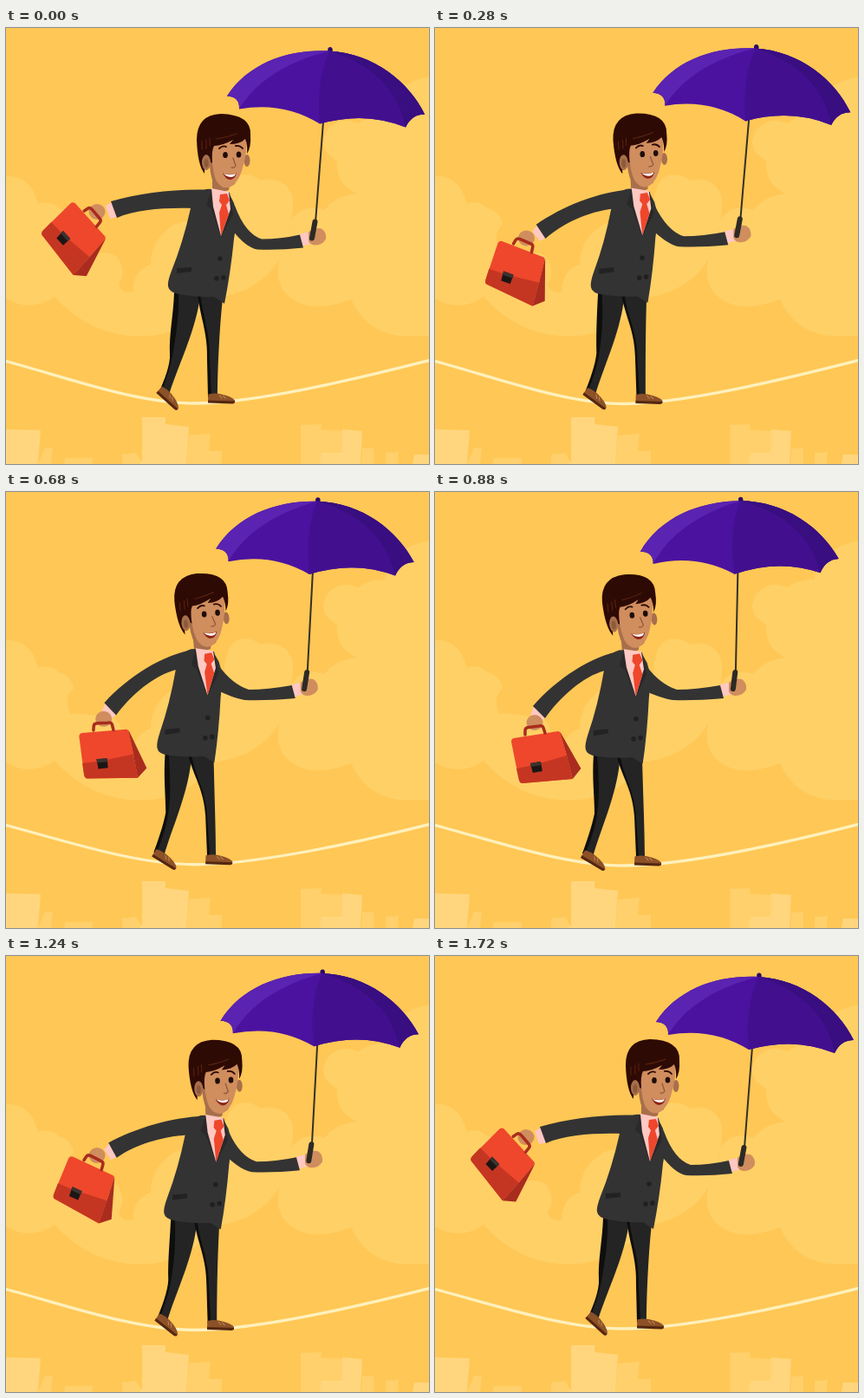
These frames come from a looping animation (488x503 px, 1760 ms). An HTML page with a canvas:

```html
<!DOCTYPE html>
<html lang="en">
<head>
<meta charset="utf-8">
<title>Tightrope walker</title>
<style>
  html, body { margin: 0; width: 100%; height: 100%; overflow: hidden; background: #ffc755; }
  canvas { display: block; }
</style>
</head>
<body>
<canvas width="488" height="503"></canvas>
<script>
const ctx = document.querySelector('canvas').getContext('2d');
const LOOP = 1760, HALF = LOOP / 2, STEP = 40;
const SUIT = '#333333', SKIN = '#d08d5e', SHADE = '#a86f4c', PINK = '#ffc8c2', RED = '#ee472c';

function fill(color, path) {
  ctx.fillStyle = color;
  ctx.fill(new Path2D(path));
}

function line(color, width, path) {
  ctx.strokeStyle = color;
  ctx.lineWidth = width;
  ctx.stroke(new Path2D(path));
}

function oval(color, x, y, rx, ry = rx) {
  ctx.fillStyle = color;
  ctx.beginPath();
  ctx.ellipse(x, y, rx, ry, 0, 0, 7);
  ctx.fill();
}

// Moves the pivot (px, py) by (dx, dy) and turns the drawing around it.
function pose(px, py, dx, dy, degrees, draw) {
  ctx.save();
  ctx.translate(px + dx, py + dy);
  ctx.rotate(degrees * Math.PI / 180);
  ctx.translate(-px, -py);
  draw();
  ctx.restore();
}

// Blends two paths of equal structure: k = 1 gives a, k = 0 gives b.
function mix(a, b, k) {
  const other = b.match(/-?[\d.]+/g);
  let i = 0;
  return a.replace(/-?[\d.]+/g, n => n * k + other[i++] * (1 - k));
}

function track(keys, t) {
  const i = keys.findIndex(key => key[0] > t);
  const [t0, v0] = keys[i - 1], [t1, v1] = keys[i];
  return v0 + (v1 - v0) * (t - t0) / (t1 - t0);
}

// 1 = leaning right, 0 = leaning left; each way eases out.
function sway(t) {
  t = (t + LOOP) % LOOP;
  return t < HALF ? (1 - t / HALF) ** 2 : 1 - (2 - t / HALF) ** 2;
}

const bobKeys = [[0, 3], [120, 5], [440, 2], [560, 1.5], [800, -2], [880, 1],
  [960, 2.5], [1080, 2], [1400, 1], [1720, 0], [1760, 3]];
const gripKeys = [[0, 227.5], [120, 229], [160, 228], [440, 219.5], [560, 217.5], [780, 207.5],
  [880, 212], [1080, 218.5], [1400, 224], [1720, 225], [1760, 227.5]];
const tiltKeys = [[0, 0], [160, .5], [440, .3], [560, -.3], [880, -3.2],
  [1080, -2], [1400, -.7], [1720, 0], [1760, 0]];

function background() {
  fill('#ffc755', 'M0,0H488V503H0Z');
  const cloud = '#ffd066';
  fill(cloud, `M0,171 Q29,170 37,203 Q49,198 61,208 Q76,212 78,227 Q66,236 74,256
    Q90,255 108,259 Q126,258 131,268 Q138,283 130,296 Q133,307 146,304 Q147,279 167,273
    Q166,244 195,226 L252,212 Q251,188 262,174 Q277,163 294,176 Q322,170 331,195
    Q332,230 318,262 Q297,304 240,312 Q218,348 168,355 Q102,361 56,310 Q28,329 0,312Z`);
  fill(cloud, `M488,56 Q446,64 437,101 Q420,100 406,110 Q386,101 372,116 Q358,136 376,149
    Q384,153 382,160 Q384,183 405,191 Q378,194 368,210 Q340,201 328,224 Q329,236 324,246
    Q306,276 319,302 Q344,334 398,313 Q414,349 452,355 H488Z`);
  const near = '#ffd67d', far = '#ffd06b';
  fill(far, 'M37,503 L45,484 H54 L52,503Z M67,503 L68,496 H100 V503Z M134,503 V492 L150,490 L158,503Z');
  fill(near, 'M0,463 L40,464 L37,503 H0Z M157,449 H184 V457 L211,460 L208,503 H153 L157,500Z');
  fill(far, 'M211,470 L236,468 L234,488 H249 V503 H208Z M340,458 L364,457 L363,463 L388,465 V503 H340Z');
  fill(near, 'M388,463 L411,465 L409,503 H387Z M364,490 H388 V503 H362Z');
  fill(far, 'M411,485 H425 V503 H410Z M438,490 L453,489 L452,503 H438Z');
  fill(near, 'M471,492 H488 V503 H469Z');
}

function shoe(x, y, degrees) {
  pose(0, 0, x, y, degrees, () => {
    fill('#8d5128', 'M-31,-1 V-9 Q-24,-11 -18,-10 Q-4,-8 0,-3 L0,0Z');
    fill('#542610', 'M-31,-2 H0 Q0,1 -3,1 H-31Z');
    line('#c08a50', 1, 'M-18,-8 L-15,-5 M-14,-8 L-11,-5');
  });
}

function legs(s) {
  fill('#0e0e0e', mix(
    'M194,302 C193,330 188,350 189,373 C190,385 182,405 177,416 L183,418 L205,370 L215,302Z',
    'M183,301 C181,330 184,350 184,370 C181,385 174,405 170,416 L177,418 L198,370 L205,301Z', s));
  fill('#242424', mix(
    'M199,302 C200,330 196,350 193,370 C190,388 184,405 179,417 L188,420 C198,388 217,350 223,313 L224,302Z',
    'M187,301 C189,330 190,350 187,370 C185,388 178,405 173,417 L182,420 C191,388 209,350 213,311 L214,301Z', s));
  fill('#0e0e0e', mix(
    'M221,305 C225,334 233,350 232,380 L233,423 L240,423 L238,305Z',
    'M210,305 C216,328 228,343 230,373 L232,420 L238,420 L230,305Z', s));
  fill('#242424', mix(
    'M224,303 C228,335 236,350 235,380 L237,423 L244,422 C244,395 246,345 250,309Z',
    'M213,301 C218,330 231,345 232,375 L235,420 L242,419 C242,390 240,345 239,306Z', s));
  shoe(195 + 2 * s, 436 + 2 * s, 31 + 11 * s);
  shoe(261 + 3 * s, 429.5, 2);
}

function caseArm(s, late) {
  const x = 106 + 10 * (1 - s) ** 5, y = 268 - 56 * s, turn = 57 * late;
  pose(0, 0, x, y, turn, () => {
    fill(RED, 'M-25,15 L26,7 Q28,7 29,10 L36,35 L43,62 L-15,67 Q-18,67 -19,63 L-28,19 Q-28,16 -25,15Z');
    fill('#c53622', 'M-22,50 L-2,46 L36,35 L43,62 L-15,67 Q-18,67 -19,63Z');
    fill('#a92c1e', 'M28,7 L52.5,50 L43,62 L36,35Z');
    fill('#1c1615', 'M-6,44 L6,42 L8,53 L-3,55Z');
    fill('#3b3430', 'M-6,44 L6,42 L7,46 L-5,48Z');
  });
  fill(PINK, mix('M122,198 L115,202 L120,217 L129,215Z', 'M114,246 L110,257 L122,264 L128,259Z', s));
  oval(SKIN, x - 1, y - 3, 9.5, 9);
  pose(0, 0, x, y, turn, () =>
    line('#a92c1e', 3.5, 'M-12,11 L-12,6 Q-12,3 -8,2.5 L4,1 Q8,0 9,3 L11,9'));
  fill(SUIT, mix(
    'M236,184 C200,182 155,187 121,197 L128,216 C150,206 185,204 216,205Z',
    'M216,182 C180,188 140,215 113,246 L127,260 C144,236 170,212 196,205Z', s));
}

function umbrella() {
  line('#333026', 2, 'M366,106 L357,222');
  oval('#2b0a66', 374, 23, 2.8, 3.5);
  fill('#4b12a0', `M255,76 C280,38 325,22 373,24 C425,27 465,60 483,97
    Q468,97 461,112 Q415,93 362,108 Q320,82 269,91 Q270,77 255,76Z`);
  fill('#5a23b2', 'M255,76 C280,38 325,22 373,24 C325,36 289,58 269,91 Q270,77 255,76Z');
  fill('#42108f', 'M373,24 Q357,60 362,108 Q415,93 461,112 Q468,97 483,97 C465,60 425,27 373,24Z');
  fill('#380e80', 'M373,24 C425,27 465,60 483,97 Q468,97 461,112 C453,68 420,38 373,24Z');
}

function umbrellaArm(x, y, tilt, s, bob) {
  pose(356, 225, x - 356, y - 225, tilt, umbrella);
  const ex = x - 69 + 6 * s, ey = y + 16, sx = 244 + 20 * s, sy = 200 + 2 * s + bob;
  pose(0, 0, x, y, 0, () => {
    fill(PINK, 'M-17,10 L-7,8 L-3,21 L-14,24Z');
    fill(SKIN, 'M-7,8 Q0,2 8,4 Q14,8 13,16 Q9,23 1,23 Q-5,23 -7,18Z');
  });
  pose(356, 225, x - 356, y - 225, tilt, () => line('#2d2a25', 6, 'M356.5,221 L353,240'));
  fill(SUIT, `M${sx - 12},${sy - 8} L${sx},${sy} Q${ex - 17},${ey - 6} ${ex + 2},${ey}
    Q${ex + 24},${ey} ${x - 17},${y + 11} L${x - 13},${y + 26}
    Q${ex + 22},${ey + 13} ${ex - 3},${ey + 12} Q${ex - 16},${ey + 10} ${sx - 3},${sy + 28}Z`);
}

function jacket() {
  fill(SUIT, `M237,183 Q220,181 213,205 Q204,245 191,277 Q186,290 187,295 Q188,302 200,304
    Q225,308 240,307 L252,315 Q259,280 263,240 Q268,215 263,199 L257,187Z`);
  fill('#292929', 'M237,183 L231,201 L237,206 L248,238 L262,212 L258,187Z');
  fill(PINK, 'M237,182 L257,186 L259,206 L248,237 L239,203Z');
  fill(RED, 'M247,189 L255,188 L258,196 L254,201 L257,212 L248,237 L246,210 L249,201 L246,197Z');
  fill('#222222', 'M197,274 L214,273 V278 L197,280Z');
  oval('#202020', 247, 263, 2.8);
  oval('#202020', 243, 286, 2.8);
  oval('#202020', 251, 285, 2.8);
}

function head() {
  fill(SHADE, 'M238,165 L238,182 Q247,188 257,184 L260,170Z');
  oval(SHADE, 278, 150, 3.5, 7);
  fill(SHADE, 'M233,122 L235,155 Q236,173 242,179 Q254,184 264,177 L272,130Z');
  fill(SKIN, 'M236,122 Q237,163 243,174 Q249,183 257,181 Q268,177 273,158 Q278,143 278,122Z');
  fill('#2e0a04', `M229,165 Q221,155 220,126 Q220,97 248,96 Q283,97 282,120
    Q283,135 278,142 Q279,132 276,125 Q270,131 258,131 L262,126 Q249,133 240,133
    Q237,138 238,153 L234,150 Q229,150 229,165Z`);
  line('#5b2512', 1, 'M226,128 V137 M231,126 V136 M235,124 V133 M243,125 Q256,123 266,119');
  oval(SHADE, 231, 152, 5, 9);
  oval('#8e5b3a', 231, 153, 2.5, 5);
  line('#2b0b05', 1.8, 'M246,136 Q250,132 254,134 M265,133 Q270,132 273,136');
  oval('#1e0d08', 253, 143.5, 2.8, 3.5);
  oval('#1e0d08', 268.5, 143, 2.8, 3.5);
  line('#8e5b3a', 1.3, 'M262,147 L265,156 Q263,159 260,158');
  fill('#8f2418', 'M250,164.5 Q258,167.5 266,164.5 Q264,172 258,172 Q253,171 250,164.5Z');
  fill('#ffffff', 'M251,165 Q258,167.5 265,165 Q264,169 259,169 Q254,168.5 251,165Z');
}

function draw(t) {
  const s = sway(t), late = sway(t - STEP), bob = track(bobKeys, t);
  const low = 430 + bob;
  background();
  line('#fff1bd', 3.3, `M-2,383.8 C70,403 150,${low} 218,${low} S400,406 490,383`);
  pose(0, 0, 0, bob, 0, () => {
    legs(s);
    caseArm(s, late);
  });
  umbrellaArm(346 + 10 * late, track(gripKeys, t), track(tiltKeys, t), s, bob);
  pose(221, 310, 12.5 * (s - 1), bob + (s - 1), 3 * (s - 1), () => {
    pose(248, 184, 3 * (s - 1), 0, 2 * (s - 1), head);
    jacket();
  });
}

ctx.lineCap = ctx.lineJoin = 'round';
function frame() {
  draw(Math.floor(performance.now() % LOOP / STEP) * STEP);
  requestAnimationFrame(frame);
}
frame();
</script>
</body>
</html>
```
